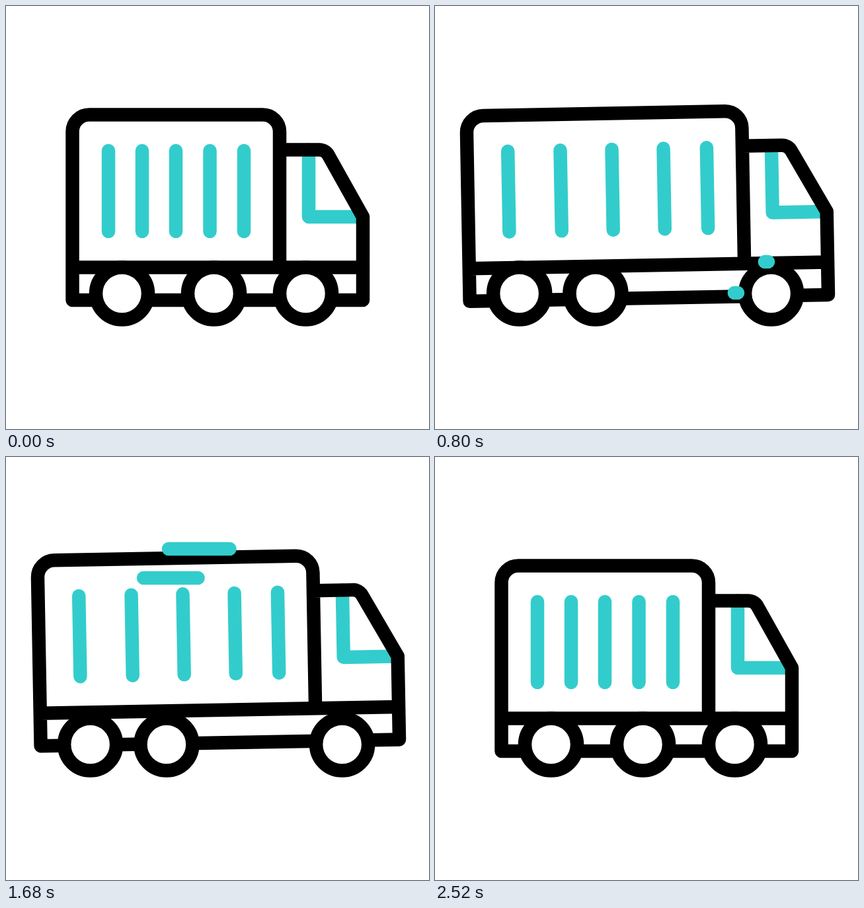
An HTML page with a canvas that plays this animation: 640x640 px, repeating every 3 s.

```html
<!DOCTYPE html>
<html lang="en">
<head>
<meta charset="utf-8">
<title>Delivery truck</title>
<style>
  html, body { margin: 0; width: 100%; height: 100%; overflow: hidden; background: #fff; }
  canvas { display: block; width: 640px; height: 640px; }
</style>
</head>
<body>
<canvas id="stage" width="640" height="640"></canvas>
<script>
const ctx = document.getElementById('stage').getContext('2d');
const LOOP = 3000;
const BLACK = '#000';
const TEAL = '#33cccc';
const LINE = 20.5;

// Truck poses: rear corner, body stretch and tilt in degrees
const REST = { x: 100.5, y: 445, stretch: 0, tilt: 0 };
const CROUCH = { x: 40.2, y: 444.8, stretch: 0, tilt: 2 };
const SPEED = { x: 52.6, y: 447.6, stretch: 103, tilt: -1.04 };
const MOVES = [
  { start: 0, end: 400, from: REST, to: CROUCH },
  { start: 400, end: 800, from: CROUCH, to: SPEED },
  { start: 1920, end: 2520, from: SPEED, to: REST }
];

// Cargo bars: offset from the rear and share of the stretch
const BARS = [[54.5, 0.07], [105.5, 0.345], [156.5, 0.607], [208, 0.865], [259.5, 1]];
// Wheels: the same two values
const WHEELS = [[75, 0], [214, -0.23], [353, 1]];

// Wind streaks: right end, height, length
const LOW = [[188, 364, 110], [265, 409, 125]];
const MIDDLE = [[504, 387, 125], [458, 434, 125]];
const HIGH = [[359.7, 139, 113.7], [309.5, 183, 101.5]];
const GUSTS = [[200, LOW], [767, MIDDLE], [1325, HIGH], [1900, LOW]];
const GUST_HALF = 279;

const BOUNCE = { start: 760, half: 280, count: 2, height: 13 };

function ease(t, start, end) {
  const u = Math.min(1, Math.max(0, (t - start) / (end - start)));
  return u * u * (3 - 2 * u);
}

function poseAt(t) {
  const move = MOVES.filter(m => t >= m.start).pop();
  const p = ease(t, move.start, move.end);
  const pose = {};
  for (const key in REST) pose[key] = move.from[key] + (move.to[key] - move.from[key]) * p;
  return pose;
}

function liftAt(t) {
  const phase = (t - BOUNCE.start) / BOUNCE.half;
  if (phase < 0 || phase > 2 * BOUNCE.count) return 0;
  return BOUNCE.height * ease(1 - Math.abs(phase % 2 - 1), 0, 1);
}

function stroke(color, ...points) {
  ctx.strokeStyle = color;
  ctx.beginPath();
  points.forEach(([x, y]) => ctx.lineTo(x, y));
  ctx.stroke();
}

// Coordinates are relative to the rear bottom corner
function drawBody(s) {
  const side = 313.5 + s, front = 439.5 + s;
  const top = -280.5, deck = -49.5, hood = -227.5, sill = -126;

  for (const [x, share] of BARS) {
    stroke(TEAL, [x + share * s, -226], [x + share * s, -104]);
  }
  stroke(TEAL, [357.5 + s, hood], [357.5 + s, sill], [front, sill]);

  ctx.strokeStyle = BLACK;
  ctx.beginPath();
  ctx.moveTo(0, 0);
  ctx.arcTo(0, top, side, top, 25.5);
  ctx.arcTo(side, top, side, deck, 25.5);
  ctx.lineTo(side, deck);
  ctx.moveTo(side, hood);
  ctx.arcTo(382.7 + s, hood, front, sill, 16);
  ctx.lineTo(front, sill);
  ctx.lineTo(front, 0);
  ctx.lineTo(0, 0);
  ctx.lineTo(0, deck);
  ctx.lineTo(front, deck);
  ctx.stroke();
}

function drawWheel(x) {
  ctx.fillStyle = '#fff';
  ctx.strokeStyle = BLACK;
  ctx.beginPath();
  ctx.arc(x, 435, 39.5, 0, 2 * Math.PI);
  ctx.fill();
  ctx.stroke();
}

function drawGust(t, start, streaks) {
  const peak = start + GUST_HALF;
  const end = peak + GUST_HALF;
  if (t <= start || t >= end) return;
  const head = ease(t, start, peak);
  const tail = ease(t, peak, end);
  for (const [x, y, length] of streaks) {
    stroke(TEAL, [x - length * head, y], [x - length * tail, y]);
  }
}

function draw(t) {
  const { x, y, stretch, tilt } = poseAt(t);
  ctx.fillStyle = '#fff';
  ctx.fillRect(0, 0, 640, 640);
  ctx.lineWidth = LINE;
  ctx.lineCap = ctx.lineJoin = 'round';

  ctx.save();
  ctx.translate(x, y - liftAt(t));
  ctx.rotate(tilt * Math.PI / 180);
  drawBody(stretch);
  ctx.restore();

  WHEELS.forEach(([offset, share]) => drawWheel(x + offset + share * stretch));
  GUSTS.forEach(([start, streaks]) => drawGust(t, start, streaks));
}

const origin = performance.now();
function tick() {
  draw((performance.now() - origin) % LOOP);
  requestAnimationFrame(tick);
}
tick();
</script>
</body>
</html>
```
